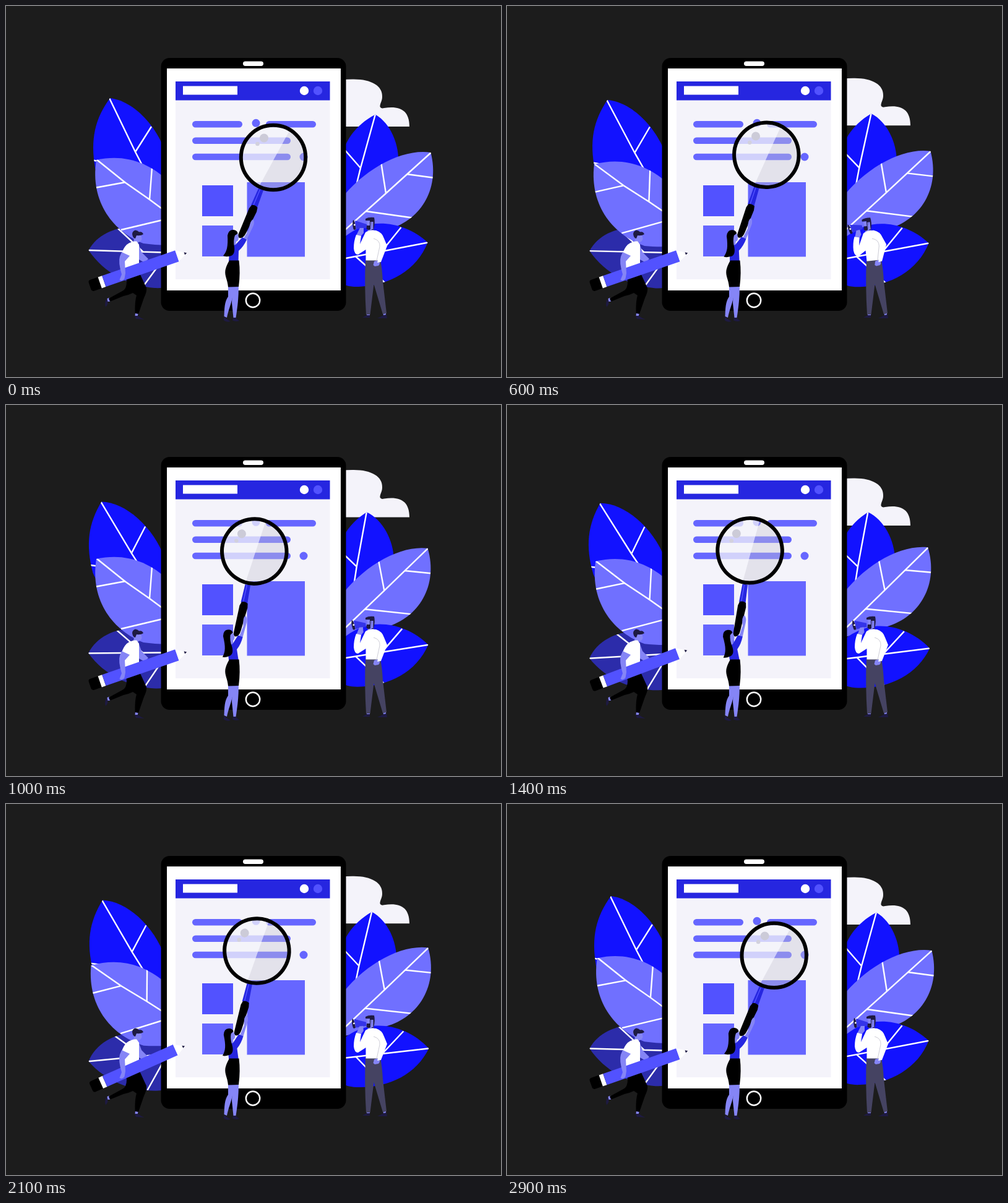
An HTML page with a canvas for the animation above (3000 ms loop, 800x600 px).

```html
<!DOCTYPE html>
<html lang="en">
<head>
<meta charset="utf-8">
<title>Tablet research</title>
<style>
html, body { margin: 0; width: 100%; height: 100%; overflow: hidden; background: #1c1c1c; }
canvas { display: block; width: 100vw; height: 100vh; }
</style>
</head>
<body>
<canvas id="stage" width="800" height="600"></canvas>
<script>
const ctx = document.getElementById('stage').getContext('2d');
const LOOP = 3000, STEP = 100;

const BLUE = '#1212ff', LILAC = '#7070ff', DUSK = '#2c2caa', BAR = '#6666ff';
const BRIGHT = '#5252ff', ROYAL = '#2626e0', SKIN = '#8585f6', NAVY = '#1e1a42';
const PAPER = '#f4f3fa', SLATE = '#454362', BLACK = '#000', WHITE = '#fff';

// Ease in and out, a little steeper than a sine.
function ease(u) {
  u = Math.min(1, Math.max(0, u));
  const a = u ** 1.8, b = (1 - u) ** 1.8;
  return a / (a + b);
}

// 0 at start, 1 at peak, 0 again at end.
function swing(t, peak = LOOP / 2, start = 0, end = LOOP) {
  return ease(t < peak ? (t - start) / (peak - start) : (end - t) / (end - peak));
}

function fill(d, color) {
  ctx.fillStyle = color;
  ctx.fill(new Path2D(d));
}

function line(d, color = WHITE, width = 2.4) {
  ctx.strokeStyle = color;
  ctx.lineWidth = width;
  ctx.stroke(new Path2D(d));
}

function rect(x, y, w, h, color, r = 0) {
  ctx.fillStyle = color;
  ctx.beginPath();
  ctx.roundRect(x, y, w, h, r);
  ctx.fill();
}

function circle(x, y, r) {
  ctx.beginPath();
  ctx.arc(x, y, r, 0, 7);
}

function dot(x, y, r, color) {
  ctx.fillStyle = color;
  circle(x, y, r);
  ctx.fill();
}

function ring(x, y, r, color, width) {
  ctx.strokeStyle = color;
  ctx.lineWidth = width;
  circle(x, y, r);
  ctx.stroke();
}

function spin(x, y, deg, draw) {
  ctx.save();
  ctx.translate(x, y);
  ctx.rotate(deg * Math.PI / 180);
  ctx.translate(-x, -y);
  draw();
  ctx.restore();
}

function leaf(x, y, deg, color, shape, veins) {
  spin(x, y, deg, () => {
    fill(shape, color);
    ctx.clip(new Path2D(shape));
    line(veins);
  });
}

function cloud(t) {
  ctx.save();
  ctx.translate(0, 1 - 14.5 * swing(t % 1500, 900, 500, 1400));
  fill('M540 118 L560 117.5 C590 117 609 128 608 146 C608 153 604 157 604.5 162 Q606 165.5 611 164 C636 160 652 167 652 194 H540 Z', PAPER);
  ctx.restore();
}

function leaves(t) {
  const sway = swing(t);
  leaf(247, 308, -6.5 * sway, BLUE,
    'M168 149 C206 153 248 196 262 250 L247 308 C200 315 155 300 144 262 C136 215 144 182 168 149 Z',
    'M167 149 L209 236 L245 305 M209 236 L235 195 M141 249.5 L225 268');
  leaf(304, 405, -7.1 * swing(t, 2100, 300), DUSK,
    'M133.5 395 C148 368 180 356 210 358 S290 375 304 405 C300 440 270 458 240 456 C200 453 158 432 133.5 395 Z',
    'M133 395 L304 400 M178 357 L222 398 M222 453 L252 412');
  leaf(320, 380, -2.5 * swing(t, 500, 0, 1000) - 4 * swing(t, 2000, 1000), LILAC,
    'M146 249 C190 239 230 252 262 283 L320 380 C290 388 250 388 222 384 C175 366 135 318 146 249 Z',
    'M146 248 L192 285 L232 313 L320 378 M144 294 L193 285 M236 261 L232 313 M186 362 L270 342');
  leaf(564, 332, -5.2 * swing(t, 1100, 0, 2900), BLUE,
    'M597 175.5 C622 190 636 225 634 255 C632 290 600 320 564 332 C525 290 530 210 597 175.5 Z',
    'M597 175 L573 262 L560 315 M540 224 L573 262');
  leaf(529, 379, -2.5 * sway, LILAC,
    'M686.5 237 C642 230 580 262 540 314 L529 379 C555 374 580 370 615 362 C668 349 702 298 686.5 237 Z',
    'M687 237 L614 303 L529 379 M648 272 L693 278 M606.5 255 L614 303 M582 332 L660 343');
  leaf(517, 413, 4.7 * swing(t, 1900, 300), BLUE,
    'M681.5 382.5 C655 358 620 348 590 353 C555 360 530 385 517 413 C525 445 545 455 570 454 C620 452 664 427 681.5 382.5 Z',
    'M682 382.5 L565 405 L517 414 M638.5 358 L607 397 M565 405 L614 449');
}

function tablet() {
  rect(250.5, 84, 299, 409, BLACK, 14);
  rect(383, 89.5, 33, 7.5, WHITE, 3.7);
  rect(260, 101, 281, 359, WHITE);
  rect(274, 122, 249.5, 320, PAPER);
  rect(274, 122, 249.5, 30.5, ROYAL);
  rect(286, 129.5, 88, 14, WHITE);
  dot(482, 137, 7.2, WHITE);
  dot(504, 137, 7.2, BRIGHT);

  const bar = (x, row, w) => rect(x, 186 + 26.4 * row, w, 10.5, BAR, 5.2);
  bar(301, 0, 81);
  bar(420, 0, 81);
  bar(301, 1, 159);
  bar(301, 2, 159);
  dot(404, 189.3, 6.5, BAR);
  dot(481, 244, 6.5, BAR);

  rect(317, 290, 50, 50, BRIGHT);
  rect(317, 355, 50, 50, BAR);
  rect(389.5, 285, 93.5, 120.5, BAR);
  ring(399, 476, 11.2, WHITE, 2.4);
}

function magnifier() {
  fill('M408 295 L416 298 L406 326 L396 322 Z', ROYAL);
  line('M410.5 297 L399.5 323', BRIGHT, 1.5);
  fill('M397 322 Q402 321 406.5 326 L405 333 L388 367 Q383 377 377 375 Q374 373 376 368 L393 327 Z', BLACK);
  ctx.save();
  circle(432, 245, 52);
  ctx.clip();
  fill('M370 180 H470 L402 305 H370 Z', 'rgba(244,244,250,.75)');
  fill('M470 180 H500 V305 H402 Z', 'rgba(198,198,210,.39)');
  dot(417, 213.5, 7, '#cccbd8');
  dot(406.5, 223, 3.3, '#d2d1dd');
  ctx.restore();
  ring(432, 245, 52.2, BLACK, 6);
}

function woman(t) {
  fill('M359 452 H368 C368 475 361 485 357 504 L352.5 502 C353 490 353 478 359 470 Z', SKIN);
  fill('M366 452 H376 C376 473 374 488 371.5 504 H367.5 L365 480 Z', SKIN);
  fill('M352.5 503 Q356 506 363 510 Q356 512 351.5 508 Z', NAVY);
  fill('M367 504 H372 Q373 507 377.5 509 Q371 511 366 508.5 Z', NAVY);
  spin(370, 412, -13.2 * swing(t), () => {
    magnifier();
    fill('M383 377 L393 361 Q394 347 399.5 345 Q402.5 350 399 357 L389 378 L381 384 Z', SKIN);
    fill('M367 366 Q374 365 375 370 L376 374 Q376 380 372 381 L371 388 H365 Z', SKIN);
    fill('M360 414 L361 396 Q364 387 371 386 L382 374 L389 378 Q384 389 376 396 L375.5 414 Z', ROYAL);
    fill('M358 371 Q360 361 368 362 Q374 363 374.5 368 L370 371 Q367 379 369 390 C370 399 367 404 362 404.5 Q355 406 351 404 C357 397 359 389 358 371 Z', BLACK);
  });
  fill('M361 411.5 H376.5 Q379 432 376 454 L359 454.5 C358 442 353 437 354.5 427 Q356 420 361 411.5 Z', BLACK);
}

function pencil() {
  ctx.save();
  ctx.translate(198, 431.4);
  ctx.rotate(-.333);
  rect(-66, -9.5, 24, 19, BLACK, 4);
  rect(-49, -9.5, 7, 19, WHITE);
  rect(-42, -9.5, 125, 19, BRIGHT);
  fill('M83 -9.5 L99.5 .6 L83 9.5 Z', WHITE);
  fill('M95.5 -2 L99.5 .6 L95.5 2.5 Z', NAVY);
  ctx.restore();
}

function writer(t) {
  fill('M167 472 L163.5 473 L164 478 H169 Z', SKIN);
  fill('M164 476 Q166 482 161 487 Q159 482 161.5 475 Z', NAVY);
  fill('M209 496 H214 L212.5 502 L208.5 501 Z', SKIN);
  fill('M208 501 H213 Q217 504 223.5 507 L210 506 Z', NAVY);
  fill('M192 426 L215 430 Q221 443 227 456 Q228 462 223 472 L214 498 L208.5 497 Q208 477 211 468 L205 464 Q197 468 190 469 L168 478 L166 473 L188 461 Q195 458 195 446 Z', BLACK);
  fill('M214 384 L219 398 L230 409 L224 415 L213 409 Z', SKIN);
  fill('M208 371 L218 369 L219.5 376 Q219 381 214 382 L212 386 H205 Z', SKIN);
  fill('M195 386 Q203 380 211 380.5 L215 386 V430 H192 V404 L187 400 Q190 391 195 386 Z', WHITE);
  fill('M204 369 Q204 364 209 362.5 Q213 363 215 365.5 Q220 364 222 369 Q218 372 211 371 L209 376 Q205 376 204 369 Z', NAVY);
  spin(198, 432, -5 * swing(t, 2000, 1000), pencil);
  fill('M187 398 L200 404 L192 413 L193 432 L191.5 441 Q188 446 183.5 443 L187 434 Q181 414 184 405 Z', SKIN);
}

function megaphone() {
  fill('M564 347 L583 353 V359 L566 361 Z', '#3434e8');
  fill('M561 346 Q564 346 565.5 361 Q563 363 561.5 361 Q559 352 561 346 Z', NAVY);
  dot(563.3, 354, 1.4, WHITE);
  fill('M572 359 H578 V367 L573 373 L566 371 Z', SKIN);
}

function speaker(t) {
  const lean = swing(t, 500, 0, 1000);
  fill('M583 496 H588 V502 H583 Z M609.5 496 H614 V501 H610 Z', SKIN);
  fill('M583 500 H588 V504 H576 Q579 502 583 500 Z M610 500 L615 499 L616 505 H600 Q605 503 610 500 Z', NAVY);
  fill('M581 410 H605 Q608 426 609 445 L615 497 L609 498.5 L594.5 450 L588.5 499 H582 Q579 450 581 410 Z', SLATE);
  spin(593, 412, -7 * lean, () => {
    spin(580, 372, -7 * lean - 6 * swing(t, 1400, 0, 2800), megaphone);
    fill('M583 348 H594 V364 L590 369 L585 366 Z', SKIN);
    fill('M581 344 Q586 341 595 342 Q597 350 594 362 H591 L590 349 H589 V361 Q585 364 582.5 360 L583 355 H588 V347 H581 Z', NAVY);
    fill('M590.5 349 H593.5 V361 H590.5 Z', SKIN);
    fill('M595 413 L602 411 Q606 416 602 420 L596 421 L593.5 419 Z', SKIN);
    fill('M566 370 L574 372 L572 385 L581 366 Q587 362 598 363 Q608 366 611 376 L616 388 L606 414 L600 415 L603 404 V411.5 H581.5 V394 L569 402 Q563 402 562 392 Q562 380 566 370 Z', WHITE);
    line('M594 376 Q605 379 604 389 L599 412', '#b9b8c6', .7);
  });
}

function draw(t) {
  ctx.fillStyle = '#1c1c1c';
  ctx.fillRect(0, 0, 800, 600);
  cloud(t);
  leaves(t);
  tablet();
  writer(t);
  woman(t);
  speaker(t);
}

const start = performance.now();
function loop() {
  const t = (performance.now() - start) % LOOP;
  draw(Math.floor(t / STEP) * STEP);
  requestAnimationFrame(loop);
}
loop();
</script>
</body>
</html>
```
